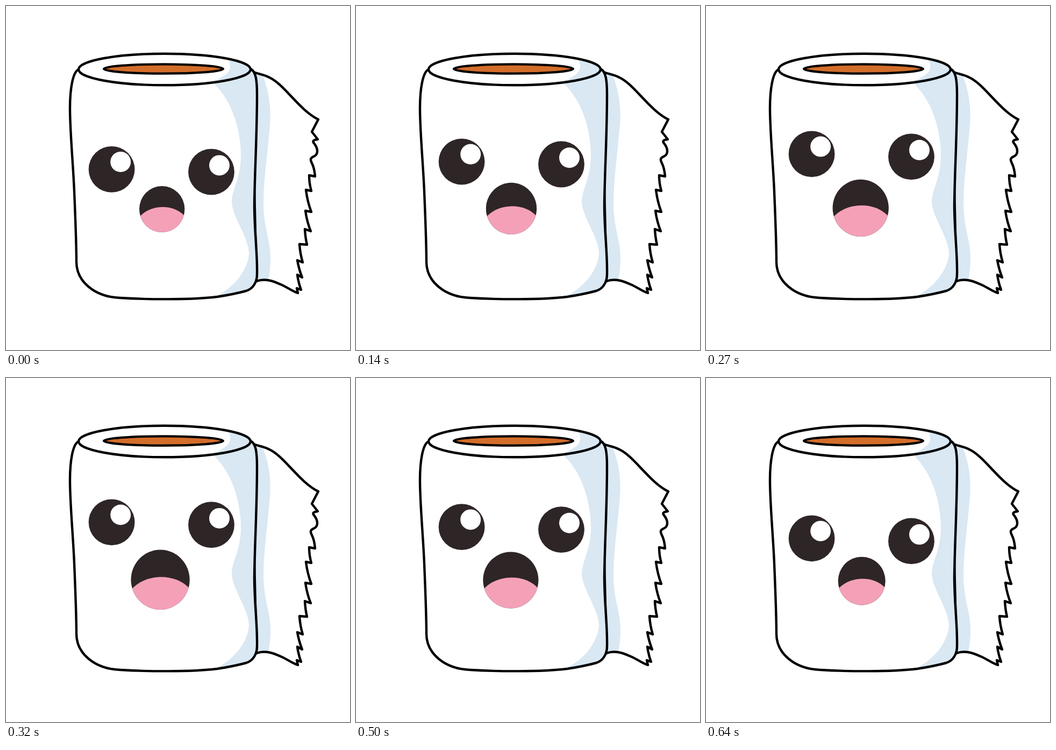
These frames come from a looping animation (640x640 px, 0.69 s). An HTML page:

```html
<!DOCTYPE html>
<html lang="en">
<head>
<meta charset="utf-8">
<title>Surprised paper roll</title>
<style>
  html, body { margin: 0; width: 100%; height: 100%; overflow: hidden; background: #fff; }
  svg { display: block; width: 100vw; height: 100vh; }
  .line { fill: none; stroke: #000; stroke-width: 4.4; stroke-linejoin: round; stroke-linecap: round; }
  .shade { fill: #d9e8f3; }
  .dark { fill: #2e2526; }
  .white { fill: #fff; }
</style>
</head>
<body>
<svg viewBox="0 0 640 640">
  <defs>
    <path id="sheet" d="M457 121C464 126 478 126 490 133C517 145 546 194 581 211L569 234L580 248
      C574 249 570 250 572 254C577 260 581 268 578 275C575 282 567 279 567 286C567 293 573 292 575 317
      L564 315Q564 330 568 344L558 342Q561 365 568 383L557 381Q560 402 567 419L556 415Q557 432 560 444
      L546 443Q547 460 552 477L542 473Q545 490 551 505L542 500Q544 515 549 528L541 525L543 534
      C533 531 523 523 511 518C498 512 482 506 466 512Z"/>
    <path id="body" d="M135 118C124 123 119 155 119 190C119 235 125 295 127 345C129 395 131 440 131 476
      C131 512 164 541 212 543C260 546 345 547 393 541C413 538 432 534 447 530C460 526 467 513 467 500
      C468 460 462 420 462 370C463 300 467 240 467 165C467 138 465 122 455 117"/>
    <ellipse id="rim" cx="295" cy="118" rx="160" ry="29.3"/>
    <clipPath id="inSheet"><use href="#sheet"/></clipPath>
    <clipPath id="inBody"><use href="#body"/></clipPath>
    <clipPath id="inRim"><use href="#rim"/></clipPath>
    <clipPath id="inMouth"><ellipse rx="42.2" ry="43"/></clipPath>
  </defs>

  <use href="#sheet" class="white"/>
  <path class="shade" clip-path="url(#inSheet)" d="M450 110L472 118C489 150 495 190 490 232
    C486 280 479 325 479 372C481 420 492 435 492 468C492 490 490 500 487 515H450Z"/>
  <use href="#sheet" class="line"/>

  <use href="#body" class="white"/>
  <path class="shade" clip-path="url(#inBody)" d="M384 142C418 172 437 225 437 280C436 325 420 340 420 365
    C422 395 452 430 452 461C450 490 425 525 388 541L400 560H480V110Z"/>
  <use href="#body" class="line"/>

  <use href="#rim" class="white"/>
  <path class="shade" clip-path="url(#inRim)" d="M409 90C420 108 420 120 408 128C402 133 394 137 380 142V160H470V80Z"/>
  <use href="#rim" class="line"/>
  <ellipse class="line" cx="293" cy="117" rx="111" ry="8.6" style="fill:#d36d2a"/>

  <g id="eyes">
    <circle class="dark" cx="196.6" cy="303.8" r="42.9"/>
    <circle class="white" cx="213.2" cy="290" r="19"/>
    <circle class="dark" cx="382" cy="308.7" r="42.9"/>
    <circle class="white" cx="397" cy="296.4" r="19"/>
  </g>
  <g id="mouth">
    <g clip-path="url(#inMouth)">
      <rect class="dark" x="-50" y="-50" width="100" height="100"/>
      <path fill="#f4a1b8" d="M-42 14.5C-21 -10 24 -10 43 14V50H-42Z"/>
    </g>
  </g>
</svg>
<script>
  const LOOP = 690, RISE = 12, FALL = 8;
  const eyes = document.getElementById('eyes');
  const mouth = document.getElementById('mouth');

  // 30 fps motion shown at 22 fps, on a 10 ms clock
  function poseAt(ms) {
    const tick = Math.floor(ms / 10);
    const shown = Math.min(14, Math.ceil((tick + 0.5) * 0.22) - 1);
    const n = Math.ceil((shown + 0.5) * 30 / 22) - 1;
    return n < RISE ? n / RISE : (RISE + FALL - n) / FALL;
  }

  function draw(now) {
    const p = poseAt(now % LOOP);
    eyes.setAttribute('transform', `translate(0 ${-42.6 * p})`);
    mouth.setAttribute('transform',
      `translate(${290.2 - 3.7 * p} ${378 - 3.3 * p}) scale(${1 + 0.353 * p})`);
  }

  const start = performance.now();
  function loop() {
    draw(performance.now() - start);
    requestAnimationFrame(loop);
  }
  loop();
</script>
</body>
</html>
```
